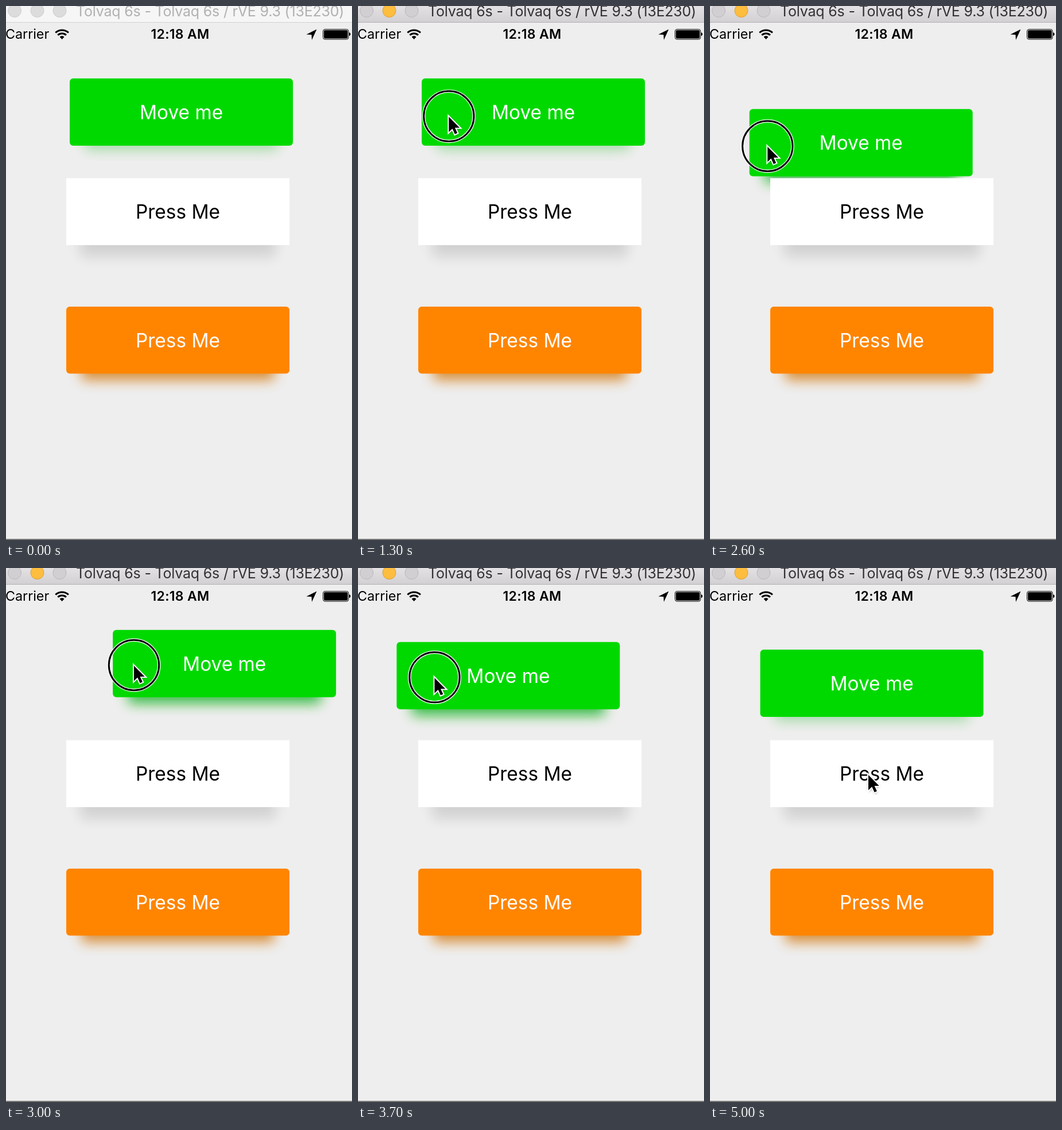
An HTML page that plays this animation: 603x929 px, repeating every 5.1 s.

```html
<!DOCTYPE html>
<html lang="en">
<head>
<meta charset="utf-8">
<title>Raised buttons</title>
<style>
  html, body { margin: 0; width: 100%; height: 100%; overflow: hidden; background: #eee; }
  svg { display: block; width: 603px; height: 929px; }
  text { font-family: Inter, Roboto, sans-serif; }
  .label { font-size: 33.4px; text-anchor: middle; }
  .title { font-size: 25px; letter-spacing: -.2px; fill: #b1b1b1; }
  .bar { fill: #f6f6f6; }
  .edge { fill: #d2d2d2; }
  .dot { fill: #dcdcdc; stroke: #cdcdcd; }
  .active .title { fill: #333133; }
  .active .bar { fill: url(#chrome); }
  .active .edge { fill: #b3b1b3; }
  .active .dot { fill: #d1cfd1; stroke: #bab8ba; }
  .active .mid { fill: #fdbd3e; stroke: #dfa033; }
</style>
</head>
<body>
<svg viewBox="0 0 603 929">
  <defs>
    <linearGradient id="chrome" x2="0" y2="1">
      <stop stop-color="#e3e1e3"/>
      <stop offset="1" stop-color="#d2d0d2"/>
    </linearGradient>
    <filter id="soft" x="-20%" y="-60%" width="140%" height="220%">
      <feGaussianBlur stdDeviation="11"/>
    </filter>
    <filter id="faint" x="-20%" y="-60%" width="140%" height="220%">
      <feGaussianBlur stdDeviation="2"/>
    </filter>
  </defs>
  <rect width="603" height="929" fill="#eee"/>

  <g id="move">
    <rect id="lift" x="26" y="30" width="337" height="98" rx="6" fill="#00ac0c" filter="url(#soft)"/>
    <rect width="389" height="117" rx="6" fill="#00d900"/>
    <text class="label" x="194.5" y="71" fill="#fff">Move me</text>
  </g>
  <g transform="translate(105 299.5)">
    <rect x="24" y="30" width="341" height="107" rx="6" opacity=".115" filter="url(#soft)"/>
    <rect width="389" height="116.5" fill="#fff"/>
    <text class="label" x="194.5" y="70.5">Press Me</text>
  </g>
  <g transform="translate(105 523)">
    <rect x="26" y="30" width="337" height="98" rx="6" fill="#d07000" opacity=".75" filter="url(#soft)"/>
    <rect width="389" height="116.5" rx="6" fill="#ff8500"/>
    <text class="label" x="194.5" y="71" fill="#fff">Press Me</text>
  </g>

  <g id="window">
    <rect class="bar" width="603" height="28"/>
    <rect class="edge" y="28" width="603" height="1"/>
    <circle class="dot" cx="15" cy="8" r="11.5"/>
    <circle class="dot mid" cx="54.5" cy="8" r="11.5"/>
    <circle class="dot" cx="93.5" cy="8" r="11.5"/>
    <text class="title" x="122" y="18">Tolvaq 6s - Tolvaq 6s / rVE 9.3 (13E230)</text>
  </g>

  <text x="-1" y="57" font-size="23.3">Carrier</text>
  <g fill="none" stroke="#000" stroke-width="3">
    <path d="M86.3 46.4a16.4 16.4 0 0 1 22.6 0M90.3 50.7a10.6 10.6 0 0 1 14.6 0"/>
    <path d="M97.6 58l-4-4.3a5.8 5.8 0 0 1 8 0z" fill="#000" stroke="none"/>
  </g>
  <text x="303.5" y="57" font-size="23" font-weight="600" letter-spacing=".3" text-anchor="middle">12:18 AM</text>
  <path d="M541.5 40.5L523.5 49.5L532.5 50L533 59z"/>
  <rect x="552.5" y="40.5" width="44.5" height="17.5" rx="3.5" fill="none" stroke="#000"/>
  <rect x="554" y="42" width="41.5" height="14.5" rx="2"/>
  <path d="M598 46q2.5 .5 2.5 3t-2.5 3z"/>
  <rect y="927" width="603" height="2" fill="#777"/>

  <g id="pointer">
    <g id="ring" fill="none">
      <circle cx="1" cy="1" r="43.7" stroke="#fff" stroke-width="5.4"/>
      <circle cx="1" cy="1" r="43.7" stroke="#000" stroke-width="3"/>
    </g>
    <g transform="translate(1 2)">
      <path d="M0 1V30L7 23L11 33L16 31L12 21H21z" opacity=".35" filter="url(#faint)"/>
      <path d="M0 0V26.5L6.2 20.6L10.6 30.2L14.9 28.3L10.6 19H18.8z"
            stroke="#fff" stroke-width="4" paint-order="stroke"/>
    </g>
  </g>
</svg>
<script>
  const LOOP = 5100, STEP = 100;
  const ENTER = 200, PRESS = 1300, DRAG = 1740, RELEASE = 4200, LAG = 80;
  const GRIP = { x: 26.5, y: 66 };

  // turning points of the hand: time, x, y
  const turns = [
    [ENTER, 28, 171], [700, 125, 187], [1400, 159, 191], [1880, 121, 195],
    [2050, 88, 205], [2220, 219, 178], [2540, 94, 246], [3000, 222, 168],
    [3280, 189, 170], [3600, 92, 195], [3850, 209, 178], [4120, 114, 208],
    [4220, 113, 205], [4800, 275, 358]
  ];

  const $ = id => document.getElementById(id);
  const ease = (t, start, end) => {
    const k = Math.min(1, Math.max(0, (t - start) / (end - start)));
    return (1 - Math.cos(Math.PI * k)) / 2;
  };

  // every swing eases out of one turning point and into the next
  function handAt(t) {
    let [t0, x, y] = turns[0];
    for (const [t1, x1, y1] of turns.slice(1)) {
      if (t <= t0) break;
      const k = ease(t, t0, t1);
      x += (x1 - x) * k;
      y += (y1 - y) * k;
      t0 = t1;
    }
    return [x, y];
  }

  // the dragged button trails the hand
  function buttonAt(t) {
    if (t < DRAG) return [111, 126];
    const [x, y] = handAt(Math.min(t, RELEASE) - LAG);
    return [x - GRIP.x, y - GRIP.y];
  }

  const place = (el, [x, y]) => el.setAttribute('transform', `translate(${x} ${y})`);
  const show = (el, on) => el.setAttribute('visibility', on ? 'visible' : 'hidden');

  function draw(t) {
    const lift = ease(t, PRESS, PRESS + 400) - ease(t, RELEASE, RELEASE + 500);
    place($('move'), buttonAt(t));
    $('lift').setAttribute('height', 94 + 4 * lift);
    $('lift').setAttribute('opacity', 0.32 + 0.43 * lift);

    place($('pointer'), handAt(t));
    show($('pointer'), t >= ENTER);
    show($('ring'), t >= PRESS && t < RELEASE);
    $('window').setAttribute('class', t >= PRESS ? 'active' : '');
  }

  const start = performance.now();
  function tick() {
    const t = (performance.now() - start) % LOOP;
    draw(Math.floor(t / STEP) * STEP);
    requestAnimationFrame(tick);
  }
  tick();
</script>
</body>
</html>
```
